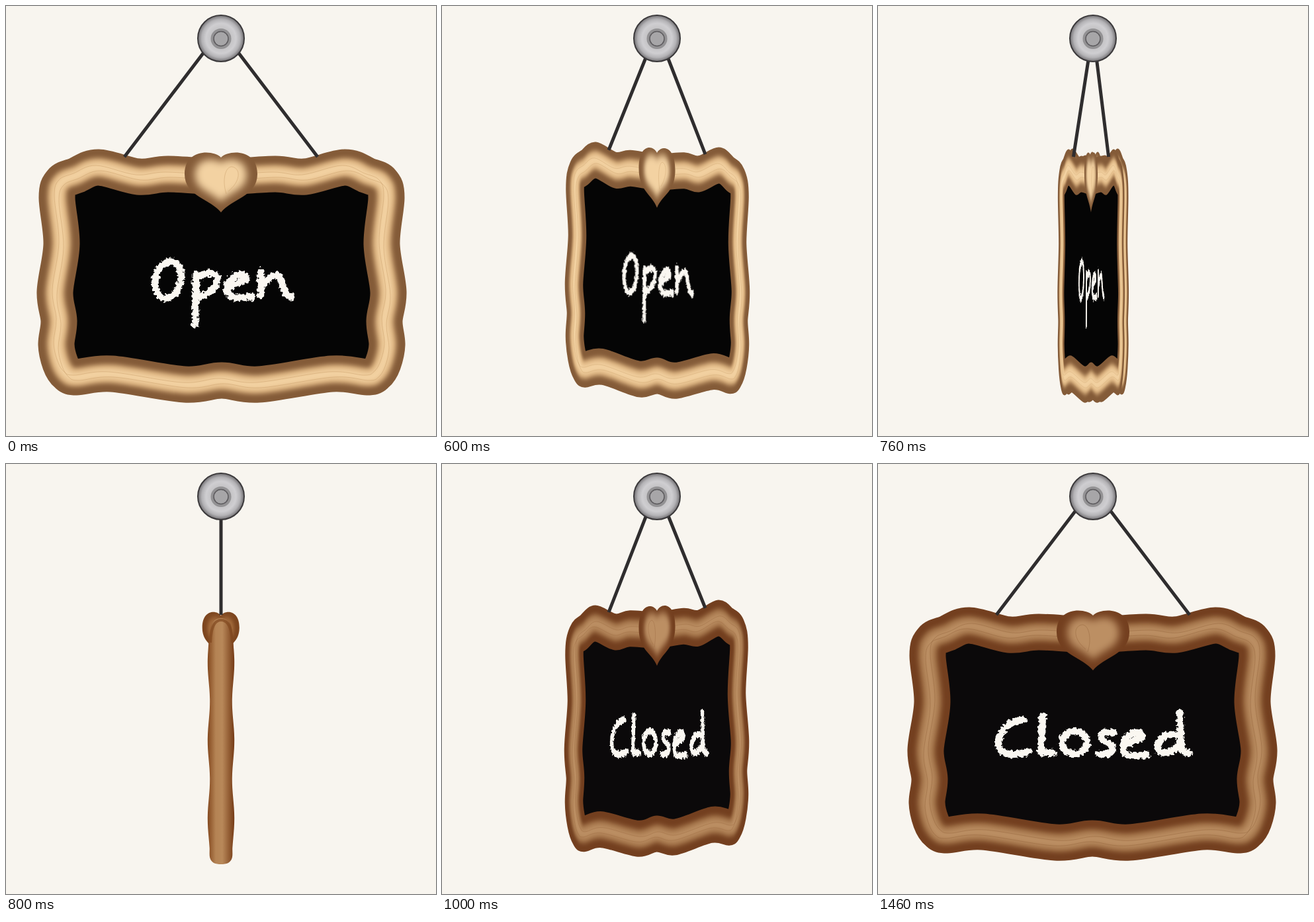
An HTML page that plays this animation: 650 by 650 pixels, repeating every 1700 ms.

```html
<!DOCTYPE html>
<html lang="en">
<head>
<meta charset="utf-8">
<title>Open / Closed sign</title>
<style>
  html, body { margin: 0; height: 100%; overflow: hidden; background: #f8f5ef; }
  svg { display: block; width: 100vw; height: 100vh; }
  .light { --edge: #845b38; --glow: #dfb682; --core: #f3d2a2; --grain: #c0935f; --slate: #050505; }
  .dark { --edge: #733f1f; --glow: #a5764c; --core: #bc8f64; --grain: #8f6038; --slate: #0b090a; }
  .side { --edge: #7d461f; --core: #a56d3d; --grain: none; }
  .edge { fill: var(--slate); stroke: var(--edge); stroke-width: 55; }
  .glow { stroke: var(--glow); stroke-width: 28; filter: url(#soft); }
  .core { stroke: var(--core); stroke-width: 13; filter: url(#soft); }
  .grain { stroke: var(--grain); opacity: .4; }
  .glow, .core, .grain, .chalk, #cords { fill: none; }
  .chalk { stroke: #faf7f1; stroke-width: 10.5; stroke-linecap: round; stroke-linejoin: round; filter: url(#rough); }
  #cords { stroke: #2f2d2e; stroke-width: 5; }
</style>
</head>
<body>
<svg viewBox="0 0 650 650">
  <defs>
    <filter id="soft" x="-20%" y="-20%" width="140%" height="140%"><feGaussianBlur stdDeviation="3.5"/></filter>
    <filter id="softer" x="-30%" y="-30%" width="160%" height="160%"><feGaussianBlur stdDeviation="8"/></filter>
    <filter id="rough" x="-10%" y="-10%" width="120%" height="120%">
      <feTurbulence type="fractalNoise" baseFrequency=".22" numOctaves="2" seed="4"/>
      <feDisplacementMap in="SourceGraphic" scale="9" xChannelSelector="R" yChannelSelector="G"/>
    </filter>
    <radialGradient id="steel">
      <stop offset=".4" stop-color="#c3c2c4"/>
      <stop offset=".65" stop-color="#cfced1"/>
      <stop offset=".83" stop-color="#b3b2b5"/>
      <stop offset="1" stop-color="#716f72"/>
    </radialGradient>
    <linearGradient id="round">
      <stop offset="0" stop-color="#84491f"/>
      <stop offset=".3" stop-color="#b48354"/>
      <stop offset=".55" stop-color="#b88859"/>
      <stop offset="1" stop-color="#763c17"/>
    </linearGradient>
    <path id="heartShape" d="M325 229C313 217 270 216 270 254C270 288 310 292 325 312C340 292 380 288 380 254C380 216 337 217 325 229Z"/>
    <g id="heart">
      <use href="#heartShape" fill="var(--edge)"/>
      <use href="#heartShape" transform="translate(94 75) scale(.71)" fill="var(--core)" filter="url(#softer)"/>
      <path class="grain" d="M333 284C326 262 332 242 342 243C356 246 354 266 336 280"/>
    </g>
    <g id="board">
      <path class="rail edge"/>
      <path class="rail glow"/>
      <path class="rail core"/>
      <path class="rail grain" transform="translate(3 5)"/>
      <path class="rail grain" transform="translate(-4 -3)"/>
      <use href="#heart"/>
    </g>
    <path id="e" d="M338 425L363 413C364 404 350 404 342 411C328 423 334 441 349 441L371 440"/>
  </defs>

  <g id="mirror">
    <use id="back" href="#board"/>
    <use id="front" href="#board"/>
    <g id="profile" class="side">
      <use href="#heart" transform="translate(159 62) scale(.51 .73)"/>
      <path id="post" fill="url(#round)"/>
      <path d="M309 270C310 243 317 236 325 236S341 243 342 270" fill="none" stroke="#80481f" stroke-width="4" opacity=".7"/>
    </g>
    <path id="cords"/>
  </g>

  <g id="open" class="chalk" role="img" aria-label="Open">
    <ellipse rx="19" ry="28" transform="translate(245 414) rotate(14)"/>
    <path d="M287 405L286 482M288 413C299 400 322 401 319 415C316 431 300 438 289 440"/>
    <use href="#e"/>
    <path d="M385 401V437M386 426C394 411 408 402 413 410C419 421 417 434 432 440"/>
  </g>
  <g id="closed" class="chalk" role="img" aria-label="Closed">
    <path d="M219 387C201 387 182 403 182 421C182 442 206 442 228 434"/>
    <path d="M249 381L246 436L264 437"/>
    <ellipse cx="297" cy="421" rx="19" ry="17"/>
    <path d="M356 407C345 403 333 409 339 416C346 422 358 425 354 433C350 440 341 439 334 438"/>
    <use href="#e" x="36"/>
    <path d="M456 376L459 429Q462 438 470 437M455 412C441 403 423 414 423 428C426 442 448 438 457 421"/>
  </g>

  <g stroke="#3b393b">
    <circle cx="325" cy="49" r="35" fill="url(#steel)" stroke-width="2"/>
    <circle cx="325" cy="49.5" r="15.5" fill="#939294" stroke="none"/>
    <circle cx="325" cy="49.5" r="11" fill="#a7a6a8" stroke="#5c5a5d" stroke-width="1.5"/>
  </g>
</svg>
<script>
const $ = id => document.getElementById(id);

// Closed Catmull-Rom curve through a half outline and its reflection in the axis of its first point.
function symmetric(half) {
  const axis = half[0][0];
  const points = [...half, ...half.slice(1, -1).reverse().map(([x, y]) => [2 * axis - x, y])];
  const at = i => points[(i + points.length) % points.length];
  const handle = (i, side) => at(i).map((v, k) => v + side * (at(i + 1)[k] - at(i - 1)[k]) / 6);
  return 'M' + points[0] + points.map((_, i) => `C${handle(i, 1)} ${handle(i + 1, -1)} ${at(i + 1)}`).join('') + 'Z';
}

// Middle of the wooden rail; every layer of the frame is a stroke along it.
const rail = symmetric([
  [326, 258], [245, 254], [200, 258], [140, 244], [106, 256], [84, 266], [77, 290], [84, 360], [74, 432],
  [80, 476], [76, 512], [82, 540], [92, 556], [107, 561], [160, 556], [270, 572], [326, 566]
]);
document.querySelectorAll('.rail').forEach(e => e.setAttribute('d', rail));

const post = [[325, 233], [311, 241]];
for (let y = 265; y < 600; y += 15) post.push([306.5 - 1.7 * Math.cos((y - 300) * Math.PI / 59), y]);
$('post').setAttribute('d', symmetric([...post, [314, 603], [325, 605]]));

// Stages of the turn from facing the viewer to edge-on.
const poses = [
  { squash: 1 },
  { squash: .5, shear: .022, lift: -7, nudge: 3 },
  { squash: .182, shift: -3, depth: 6, nudge: 3 },
  { squash: 0 }
];

// Horizontal squash around the centre line, with a vertical shear and offsets.
const matrix = (squash, shear, dx, dy) =>
  `matrix(${squash} ${shear} 0 1 ${325 + dx - 325 * squash} ${dy - 325 * shear})`;

const show = (id, on) => $(id).setAttribute('display', on ? 'inline' : 'none');

function draw(step) {
  const { squash, shear = 0, lift = 0, shift = 0, depth = 0, nudge = 0 } = poses[3 - Math.abs(3 - step)];
  const turned = step > 3;
  const place = matrix(squash, shear, shift, lift);
  const cord = side => `M325 36L${325 + shift + side * 146 * squash} ${228 + lift + side * 146 * shear}`;

  $('mirror').setAttribute('transform', turned ? 'matrix(-1 0 0 1 650 0)' : '');
  $('mirror').setAttribute('class', turned ? 'dark' : 'light');
  $('front').setAttribute('transform', place);
  $('back').setAttribute('transform', `translate(${depth} -1) ${place}`);
  $('open').setAttribute('transform', place);
  $('closed').setAttribute('transform', matrix(squash, 0, nudge, 0));
  $('cords').setAttribute('d', cord(-1) + cord(1));
  show('front', squash);
  show('back', depth);
  show('profile', !squash);
  show('open', squash && !turned);
  show('closed', turned);
}

let shown = -1;
function tick() {
  const t = performance.now() % 1700;
  const step = t < 600 ? 0 : Math.min(6, 1 + Math.floor((t - 600) / 100));
  if (step !== shown) draw(shown = step);
  requestAnimationFrame(tick);
}
tick();
</script>
</body>
</html>
```
